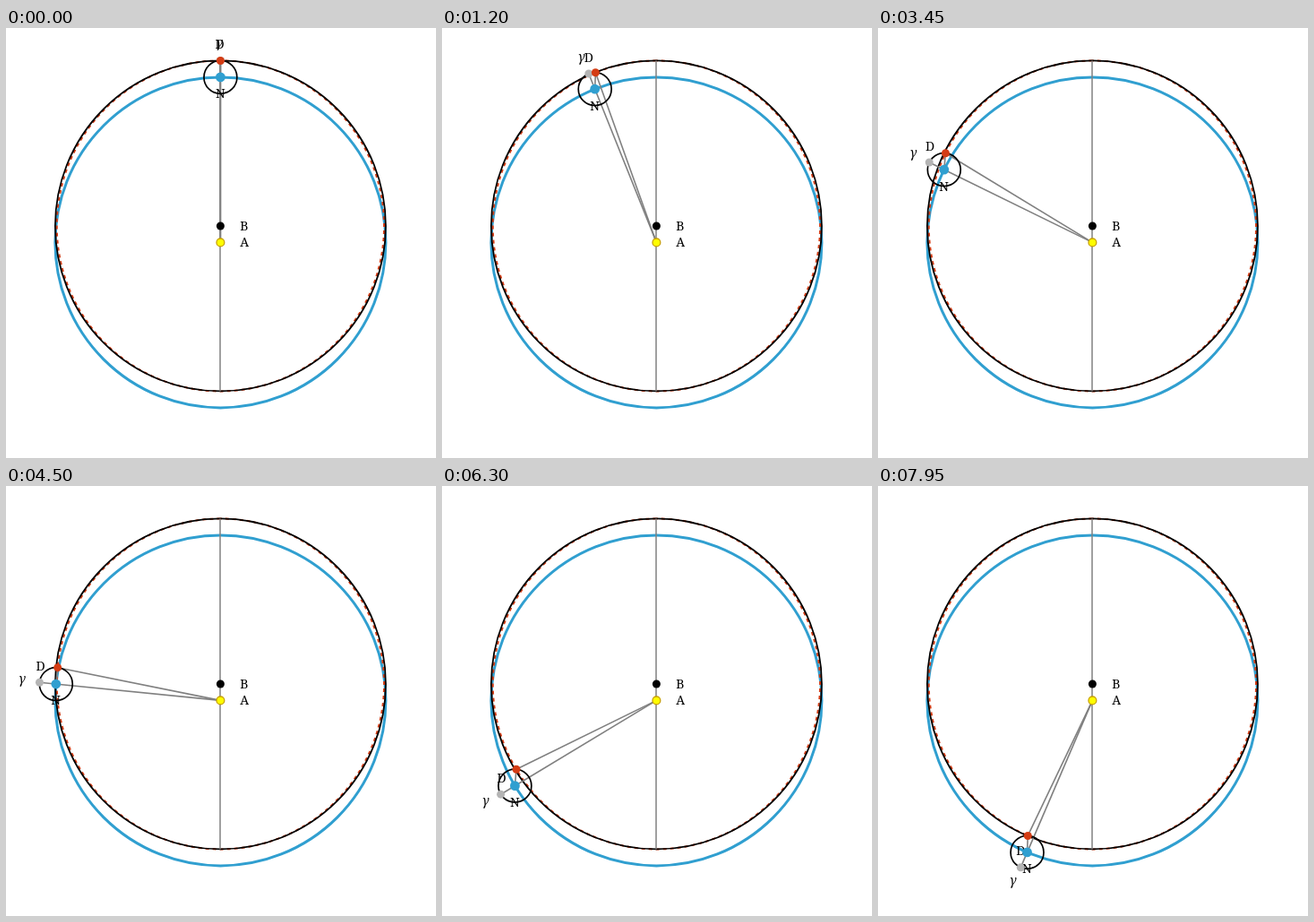
An HTML page with a canvas for the animation above (8 s loop, 480x480 px).

```html
<!DOCTYPE html>
<html lang="en">
<head>
<meta charset="utf-8">
<title>Epicycle orbit</title>
<style>
html, body { margin: 0; width: 100%; height: 100%; overflow: hidden; background: #fff; }
canvas { display: block; width: 480px; height: 480px; }
</style>
</head>
<body>
<canvas id="stage" width="480" height="480"></canvas>
<script>
const ctx = document.getElementById('stage').getContext('2d');
const LOOP = 8000, STEP = 150, STEP_ANGLE = Math.PI / 60;
const R = 184.5, ECC = 0.1, r = R * ECC;
const A = { x: 239.4, y: 239.4 };
const B = { x: A.x, y: A.y - r };
const BLACK = '#000', GRAY = '#808080', BLUE = '#309fd0', RED = '#d43c14';

// Angles run counterclockwise from straight up.
const polar = (p, len, a) => ({ x: p.x - len * Math.sin(a), y: p.y - len * Math.cos(a) });

function pose(mean) {
  const angle = Math.atan2(Math.sin(mean), Math.cos(mean) + ECC);
  const N = polar(A, R, angle);
  return { angle, N, D: polar(N, r, angle - mean), G: polar(N, r, angle) };
}

function ring(c, radius, color, width) {
  ctx.beginPath();
  ctx.arc(c.x, c.y, radius, 0, 2 * Math.PI);
  ctx.strokeStyle = color;
  ctx.lineWidth = width;
  ctx.stroke();
}

function dot(c, radius, color) {
  ctx.beginPath();
  ctx.arc(c.x, c.y, radius, 0, 2 * Math.PI);
  ctx.fillStyle = color;
  ctx.fill();
}

function line(p, q, width = 1.6) {
  ctx.beginPath();
  ctx.moveTo(p.x, p.y);
  ctx.lineTo(q.x, q.y);
  ctx.strokeStyle = GRAY;
  ctx.lineWidth = width;
  ctx.stroke();
}

// Centres the ink of a glyph on (x, y).
function label(text, x, y, style = '') {
  ctx.font = style + ' 14px "Noto Serif", "Liberation Serif", serif';
  ctx.textAlign = 'left';
  ctx.textBaseline = 'alphabetic';
  ctx.fillStyle = BLACK;
  const m = ctx.measureText(text);
  ctx.fillText(text,
    x + (m.actualBoundingBoxLeft - m.actualBoundingBoxRight) / 2,
    y + (m.actualBoundingBoxAscent - m.actualBoundingBoxDescent) / 2);
}

const path = new Path2D();
for (let i = 0; i <= 360; i++) {
  const { D } = pose(i * Math.PI / 180);
  path.lineTo(D.x, D.y);
}

function draw(time) {
  const { angle, N, D, G } = pose(Math.floor(time / STEP) * STEP_ANGLE);
  ctx.fillStyle = '#fff';
  ctx.fillRect(0, 0, 480, 480);

  ring(A, R, BLUE, 3);
  ctx.setLineDash([4, 4]);
  ctx.strokeStyle = RED;
  ctx.lineWidth = 2;
  ctx.stroke(path);
  ctx.setLineDash([]);
  ring(B, R, BLACK, 1.8);

  line({ x: 239, y: B.y - R }, { x: 239, y: B.y + R }, 1.5);
  line(A, D);
  line(A, G);
  line(N, D);
  ring(N, r, BLACK, 1.7);

  const dLabel = polar(D, r, angle), gLabel = polar(G, r, angle);
  label('γ', gLabel.x - 0.6, gLabel.y + 0.6, 'italic');
  label('D', dLabel.x - 0.8, dLabel.y);
  label('N', N.x, N.y + r);
  label('B', 265.7, 221.2);
  label('A', 266.2, 239.2);

  dot(G, 4.5, '#b4b4b4');
  dot(N, 5.4, BLUE);
  dot(D, 4.5, RED);
  dot(B, 4.5, BLACK);
  dot(A, 4.4, '#ff0');
  ring(A, 4.4, '#c8a000', 1.3);
}

function tick() {
  draw(performance.now() % LOOP);
  requestAnimationFrame(tick);
}
tick();
</script>
</body>
</html>
```
